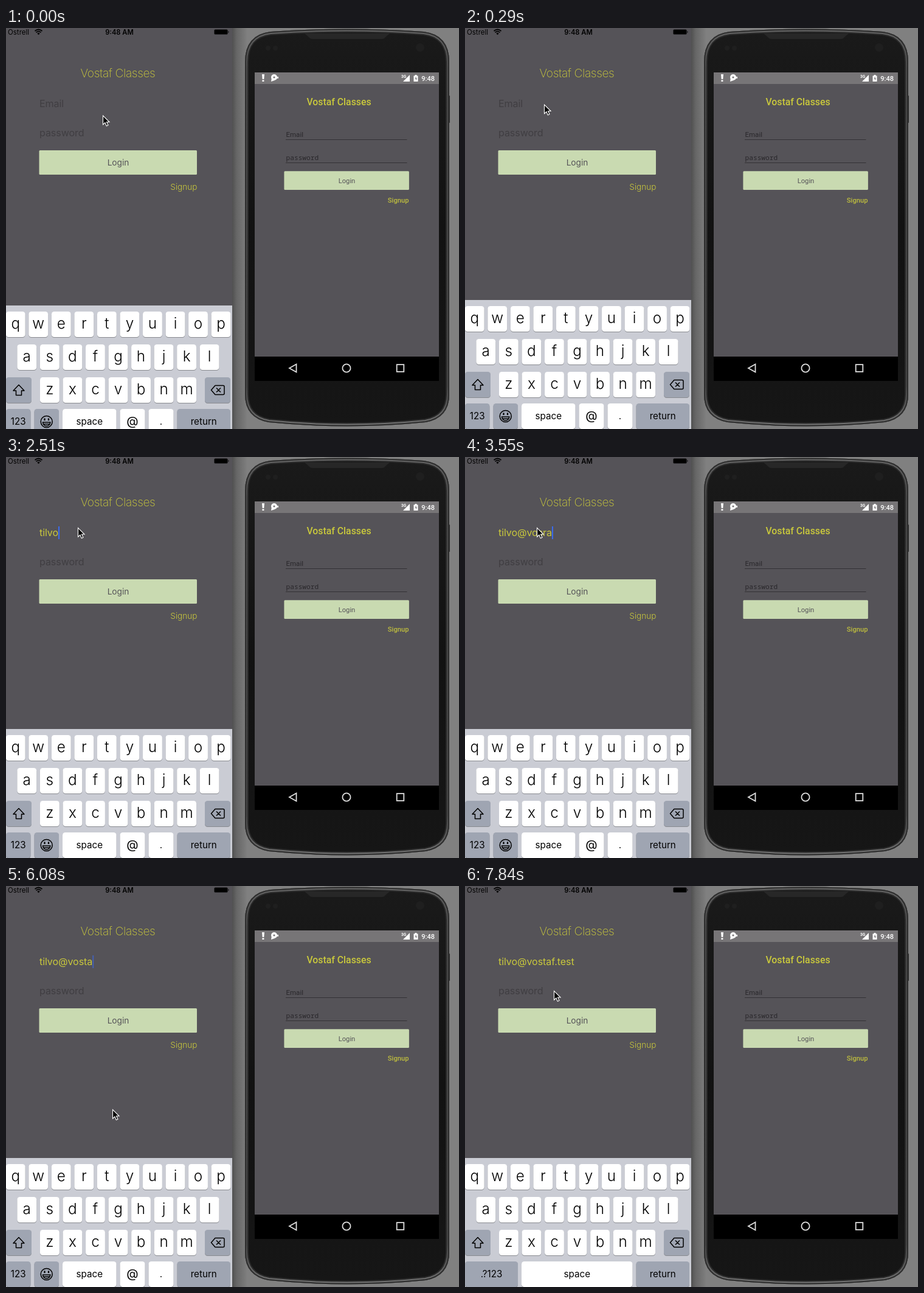
Recreate the animation shown at these times as an HTML page. Size 745 by 659 pixels, loop 8 s.

```html
<!DOCTYPE html>
<html lang="en">
<head>
<meta charset="utf-8">
<title>Login on two phones</title>
<style>
  html, body { margin: 0; width: 100%; height: 100%; overflow: hidden; background: #808080; }
  svg { display: block; width: 745px; height: 659px; }
  text { white-space: pre; }
  .ios { font-family: Inter, sans-serif; }
  .droid { font-family: Roboto, sans-serif; }
  .mono { font-family: "Noto Sans Mono", monospace; }
  .mid { text-anchor: middle; }
  .end { text-anchor: end; }
  .accent { fill: #c9c83c; }
  .field { font-size: 16.1px; letter-spacing: -.1px; }
  .hint { fill: #403e42; }
  .key { font-size: 24.3px; font-weight: 330; }
  .label { font-size: 15.2px; }
</style>
</head>
<body>
<svg viewBox="0 0 745 659">
  <defs>
    <linearGradient id="shade">
      <stop offset="0" stop-color="#505050"/>
      <stop offset=".3" stop-color="#666"/>
      <stop offset="1" stop-color="#7e7e7e"/>
    </linearGradient>
    <linearGradient id="rim" x2="0" y2="1">
      <stop offset="0" stop-color="#666"/>
      <stop offset=".1" stop-color="#484848"/>
      <stop offset=".9" stop-color="#444"/>
      <stop offset="1" stop-color="#747474"/>
    </linearGradient>
    <linearGradient id="body" x2="0" y2="1">
      <stop offset="0" stop-color="#1a1a1a"/>
      <stop offset=".5" stop-color="#121212"/>
      <stop offset="1" stop-color="#161616"/>
    </linearGradient>
    <path id="shell" d="M393 56Q393 11 435 6Q561 -3 687 6Q729 11 729 56V602Q729 641 690 648Q561 661 432 648Q393 641 393 602Z"/>
    <clipPath id="phone"><rect width="372" height="659"/></clipPath>
    <clipPath id="inside"><use href="#shell"/></clipPath>
  </defs>

  <rect width="745" height="659" fill="#808080"/>
  <rect x="372" width="24" height="659" fill="url(#shade)"/>

  <g class="droid">
    <rect x="727" y="111" width="3" height="45" rx="1" fill="#2c2c2c"/>
    <g clip-path="url(#inside)">
      <use href="#shell" fill="url(#body)" stroke="#2a2a2a" stroke-width="12"/>
      <use href="#shell" fill="none" stroke="url(#rim)" stroke-width="8"/>
      <use href="#shell" fill="none" stroke="#2e2e2e" stroke-width="4"/>
    </g>
    <path d="M491 9H631L624 15Q622 18 618 18H504Q500 18 498 15Z" fill="#272727"/>
    <g fill="#1f1f1f">
      <circle cx="431" cy="33" r="4"/><circle cx="443" cy="33" r="4"/>
      <circle cx="681" cy="32" r="7"/>
    </g>

    <rect x="409" y="73" width="303" height="468" fill="#555358"/>
    <rect x="409" y="73" width="303" height="19" fill="#777577"/>
    <rect x="409" y="540" width="303" height="40"/>
    <g fill="#fff">
      <path d="M421 76h4l-.7 8h-2.600zM421.400 85.500h3v2.500h-3z"/>
      <circle cx="441" cy="81" r="5"/>
      <path d="M436 88l1-6 5 4zM445 80h3v3h-3z"/>
      <path d="M664 77v11h-11z"/>
      <path d="M670.500 78.500h2v-1.500h3v1.500h2v9.500h-7z"/>
      <text x="650" y="82" font-size="6.500" font-weight="700">3G</text>
      <text x="705" y="86.500" class="end" font-size="11" font-weight="500">9:48</text>
    </g>
    <path d="M674.500 79.500l-2 4h1.500v3l2-4h-1.500z" fill="#777577"/>
    <circle cx="441" cy="81" r="1.600" fill="#777577"/>

    <text x="547.500" y="126.500" class="mid accent" font-size="15.800" font-weight="500">Vostaf Classes</text>
    <text x="460.500" y="179" font-size="11.500" fill="#29272b">Email</text>
    <text x="460.500" y="217" class="mono" font-size="11.200" fill="#29272b">password</text>
    <path d="M460 183.500h199.500M460 221.500h199.500" stroke="#333135"/>
    <rect x="457.400" y="235.300" width="205.500" height="30.700" rx="1.500" fill="#c9dab1"/>
    <text x="560.500" y="255" class="mid" font-size="11.200" fill="#555358">Login</text>
    <text x="662.500" y="287" class="end accent" font-size="11.200" font-weight="500" opacity=".9">Signup</text>

    <g fill="none" stroke="#e0e0e0" stroke-width="1.800">
      <path d="M466 559l11.500-6.500v13zM642.700 553.200h11.600v11.600h-11.600z"/>
      <circle cx="560" cy="559" r="6.600"/>
    </g>
  </g>

  <g class="ios" clip-path="url(#phone)">
    <rect width="372" height="659" fill="#555358"/>
    <text x="3" y="10.500" font-size="11.500">Ostrell</text>
    <g fill="none" stroke="#000" stroke-width="1.700">
      <path d="M47.500 5q6-5 12 0M49.500 7.300q4-3.200 8 0"/>
    </g>
    <path d="M51.300 8.900q2.200-1.700 4.400 0l-2.200 2.300z"/>
    <text x="186.500" y="10.500" class="mid" font-size="11.200" font-weight="600">9:48 AM</text>
    <rect x="342.500" y="2.500" width="22" height="8" rx="1.500"/>
    <path d="M365.500 4.500q2 2 0 4z"/>

    <text x="184" y="80.500" class="mid accent" font-size="19.200" font-weight="200" letter-spacing="-.4">Vostaf Classes</text>
    <text id="emailHint" x="55" y="130" class="field hint">Email</text>
    <text id="email" x="55" y="130" class="field accent"></text>
    <text x="55" y="178" class="field hint">password</text>
    <rect id="caret" y="114" width="2" height="21" fill="#3b6cf0"/>
    <rect x="54.500" y="201" width="259.500" height="40" rx="1.500" fill="#c9dab1"/>
    <text x="184.500" y="226" class="mid" font-size="13.700" fill="#555358">Login</text>
    <text x="314.500" y="266" class="end accent" font-size="13.600" font-weight="300">Signup</text>

    <g id="popup">
      <path d="M28 59H82a8 8 0 0 1 8 8V87a8 8 0 0 1-8 8H63l-8 8-8-8H28a8 8 0 0 1-8-8V67a8 8 0 0 1 8-8z" fill="#29282b"/>
      <text x="55" y="82" class="mid" font-size="13.500" fill="#c8c8ca">Paste</text>
    </g>
    <g id="keyboard"></g>
  </g>

  <path id="mouse" d="M.5.500V15.200L3.900 12 6.300 17.500 8.900 16.300 6.500 11H11z" stroke="#fff" stroke-width="1.100"/>
</svg>

<script>
const LOOP = 8000;
const $ = id => document.getElementById(id);

// Keyboard
const keyCap = (x, y, w, fill = '#fff') =>
  `<rect x="${x}" y="${y + 1}" width="${w}" height="42" rx="4.5" fill="#898b90"/>` +
  `<rect x="${x}" y="${y}" width="${w}" height="42" rx="4.5" fill="${fill}"/>`;
const labelKey = (x, w, label, fill) =>
  keyCap(x, 617, w, fill) + `<text x="${x + w / 2}" y="643" class="mid label">${label}</text>`;
const letterRow = (letters, x0, y) => [...letters].map((c, i) => {
  const x = x0 + i * 37.54;
  return keyCap(x, y, 31.8) + `<text x="${x + 15.9}" y="${y + 28}" class="mid key">${c}</text>`;
}).join('');

const GREY = '#9fa5b2';
const smiley = `<g fill="none" stroke="#000" stroke-width="1.5">
  <circle cx="66.700" cy="638" r="9.500"/><path d="M60.500 639h12.400q-1 6-6.200 6t-6.200-6zM61.500 642h10.400"/>
  <path d="M63.500 632.500v3.500M70 632.500v3.500" stroke-width="2.200"/></g>`;

$('keyboard').innerHTML = `<rect y="447" width="372" height="222" fill="#caccd4"/>` +
  letterRow('qwertyuiop', -.2, 457) + letterRow('asdfghjkl', 18.4, 511) + letterRow('zxcvbnm', 56, 565) +
  keyCap(0, 565, 42, GREY) + keyCap(327, 565, 42, GREY) +
  `<g fill="none" stroke="#000" stroke-width="1.5" stroke-linejoin="round">
    <path d="M21 577.500l9 9.500h-4.500v7.500h-9V587H12z"/>
    <path d="M344 578.500h13q2 0 2 2v11q0 2-2 2h-13l-6.500-7.500zM346 582.500l7 7m0-7l-7 7"/></g>` +
  `<g id="mailRow">${labelKey(0, 40.5, '123', GREY)}${keyCap(46.5, 617, 40.5, GREY)}${smiley}` +
  `${labelKey(93, 88.5, 'space')}${keyCap(187.5, 617, 41)}` +
  `<text x="208" y="644" class="mid" font-size="20">@</text>${labelKey(234.5, 41, '.')}</g>` +
  `<g id="plainRow">${labelKey(0, 87, '.?123', GREY)}${labelKey(93, 182.5, 'space')}</g>` +
  labelKey(281.5, 87.5, 'return', GREY);

// Tracks: [start ms, value...], each held until the next step
const USER = 'tilvo', MAIL = 'tilvo@vostaf.test';
const stub = n => MAIL.slice(0, n);
const typed = [
  [0, ''], [1470, stub(1)], [1620, stub(3)], [1770, USER], [1920, USER + 'e'], [2510, USER],
  [2960, stub(6)], [3110, stub(7)], [3260, stub(8)], [3400, stub(9) + 'r'], [3550, stub(9) + 'ra'],
  [4440, stub(9) + 'r'], [4890, stub(9)],
  [5930, stub(10)], [6080, stub(11)], [6230, stub(12)], [6380, stub(13)], [6520, stub(15)], [6660, MAIL]
];
const caret = [
  [0, 0], [430, 1], [730, .5], [880, 0], [1470, 1], [4150, .5], [4300, 0], [4440, 1], [4890, .7],
  [5190, .3], [5340, 0], [5930, 1], [6080, .6], [6230, 1], [7110, .5], [7260, 0]
];
const mouse = [
  [0, 159, 143.5], [140, 147, 135], [290, 130, 125.5], [430, 121, 119], [580, 118, 116],
  [5190, 97, 140], [5340, 112, 255], [5490, 160, 345], [5630, 175, 367],
  [7110, 171, 335], [7260, 158, 240], [7400, 149, 186], [7550, 147, 174], [7700, 146, 172]
];
const slide = [[0, 9], [140, 1], [290, 0]];
const popup = [[0, 0], [1320, 1], [1470, .5], [1620, 0]];
const PASSWORD_FOCUS = 7840;

const at = (track, t) => track.findLast(step => step[0] <= t).slice(1);
const show = (id, on) => { $(id).style.display = on ? '' : 'none'; };

function draw(t) {
  const [text] = at(typed, t);
  const [mx, my] = at(mouse, t);
  const email = $('email');
  if (email.textContent !== text) email.textContent = text;
  show('emailHint', !text);
  $('caret').setAttribute('x', text ? 55 + email.getComputedTextLength() : 54);
  $('caret').setAttribute('opacity', at(caret, t)[0]);
  $('popup').setAttribute('opacity', at(popup, t)[0]);
  $('mouse').setAttribute('transform', `translate(${mx} ${my})`);
  $('keyboard').setAttribute('transform', `translate(0 ${at(slide, t)[0]})`);
  show('mailRow', t < PASSWORD_FOCUS);
  show('plainRow', t >= PASSWORD_FOCUS);
}

const start = performance.now();
function tick() {
  draw((performance.now() - start) % LOOP);
  requestAnimationFrame(tick);
}
tick();
</script>
</body>
</html>
```
